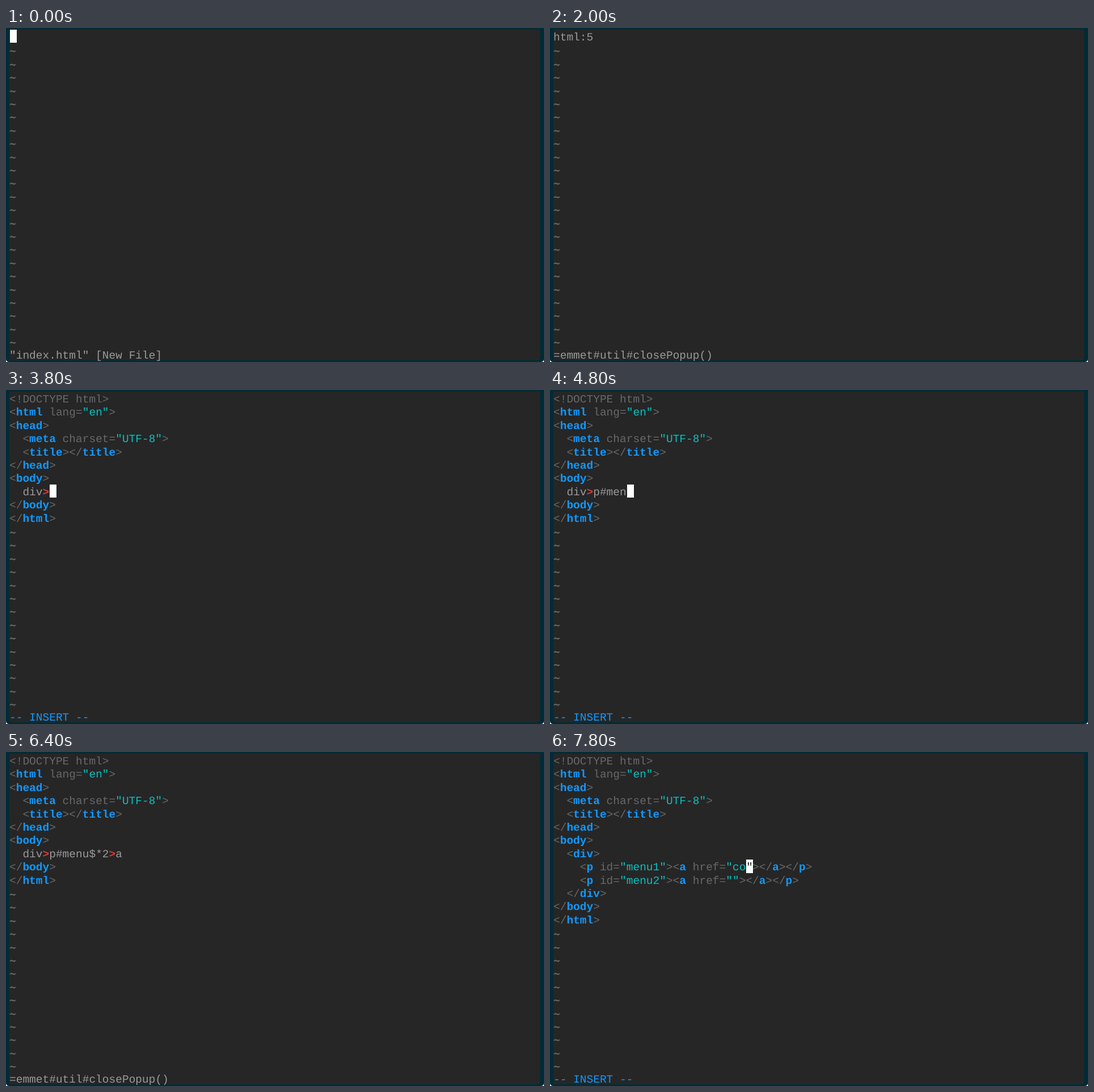
An HTML page for the animation above (8 s loop, 949 by 590 pixels).

```html
<!DOCTYPE html>
<html lang="en">
<head>
<meta charset="UTF-8">
<title>Terminal editor</title>
<style>
  html, body { margin: 0; width: 100%; height: 100%; overflow: hidden; background: #fff; }
  #window {
    position: relative; width: 949px; height: 590px; overflow: hidden;
    background: #002b36; border-radius: 0 0 5px 5px;
    font: 19.5px/23.4px "Liberation Mono", monospace;
    text-rendering: geometricPrecision; font-variant-ligatures: none;
    color: #9a9a9a; white-space: pre;
  }
  #pane { position: absolute; left: 6px; top: 3px; width: 936px; height: 584px; background: #262626; }
  .row, #cursor { position: absolute; left: 0; height: 23.4px; }
  #cursor { width: 12px; box-sizing: border-box; padding-top: 3px; background: #fff; color: #262626; }
  .dim { color: #686868; }
  .tag { color: #1199ff; font-weight: bold; }
  .str { color: #0bc0c0; }
  .op { color: #d73a36; font-weight: bold; }
  .mode { color: #1199ff; }
  .tilde { color: #686868; font-family: "DejaVu Sans Mono", monospace; font-weight: bold; }
</style>
</head>
<body>
<div id="window"><div id="pane"></div></div>
<script>
const CELL = 11.7, LINE = 23.4, ROWS = 25, STEP = 200, LOOP = 8000;
const INSERT = '-- INSERT --';
const CLOSE = '=emmet#util#closePopup()';
const EXPAND = '=emmet#expandAbbr(0,"")';

const head = ['<!DOCTYPE html>', '<html lang="en">', '<head>', '  <meta charset="UTF-8">',
  '  <title></title>', '</head>', '<body>'];
const tail = ['</body>', '</html>'];
const page = (...body) => [...head, ...body, ...tail];
const menu = href => ['  <div>',
  `    <p id="menu1"><a href="${href}"></a></p>`,
  '    <p id="menu2"><a href=""></a></p>',
  '  </div>'];

// One state per step; cursor is [row, column] or absent.
const states = [];
const add = (lines, status, cursor) => states.push({ lines, status, cursor });

function type(text, row, column, wrap) {
  for (let n = 0; n <= text.length; n++) add(wrap(text.slice(0, n)), INSERT, [row, column + n]);
}

function expand(before, partials, after) {
  add(before, INSERT);
  add(before, CLOSE);
  add(before, EXPAND);
  partials.forEach(lines => add(lines, EXPAND));
  add(after, EXPAND);
}

add([''], '"index.html" [New File]', [0, 0]);
type('html:5', 0, 0, text => [text]);
states.push(states[states.length - 1]);
expand(['html:5'], [head.slice(0, 3), head.slice(0, 5)], page('  '));

const abbr = 'div>p#menu$*2>a';
type(abbr, 7, 2, text => page('  ' + text));
expand(page('  ' + abbr), [page(...menu('').slice(0, 1)), page(...menu('').slice(0, 3))], page(...menu('')));
type('co', 8, 27, text => page(...menu(text)));

const pane = document.getElementById('pane');
const block = props => pane.appendChild(Object.assign(document.createElement('div'), props));
const rows = Array.from({ length: ROWS }, (_, i) => {
  const row = block({ className: 'row' });
  row.style.top = 3 + i * LINE + 'px';
  return row;
});
const cursor = block({ id: 'cursor' });

function span(text, className) {
  return Object.assign(document.createElement('span'), { textContent: text, className });
}

function highlight(line) {
  if (line.startsWith('<!')) return [span(line, 'dim')];
  if (!line.trim().startsWith('<')) {
    return line.split(/(>)/).map((part, i) => span(part, i % 2 ? 'op' : ''));
  }
  return line.split(/("[^"]*"|(?<=<\/?)[a-z]+)/).map((part, i) =>
    span(part, i % 2 === 0 ? 'dim' : part[0] === '"' ? 'str' : 'tag'));
}

function draw({ lines, status, cursor: at }) {
  rows.forEach((row, i) => {
    if (i === ROWS - 1) row.replaceChildren(span(status, status === INSERT ? 'mode' : ''));
    else if (i < lines.length) row.replaceChildren(...highlight(lines[i]));
    else row.replaceChildren(span('~', 'tilde'));
  });
  cursor.hidden = !at;
  if (!at) return;
  const [r, c] = at;
  cursor.style.left = 1 + c * CELL + 'px';
  cursor.style.top = r * LINE + 'px';
  cursor.textContent = lines[r][c] || '';
}

let shown = -1;
const start = performance.now();
function tick(now) {
  const index = Math.floor(Math.max(0, now - start) % LOOP / STEP);
  if (index !== shown) draw(states[shown = index]);
  requestAnimationFrame(tick);
}
tick(start);
</script>
</body>
</html>
```
